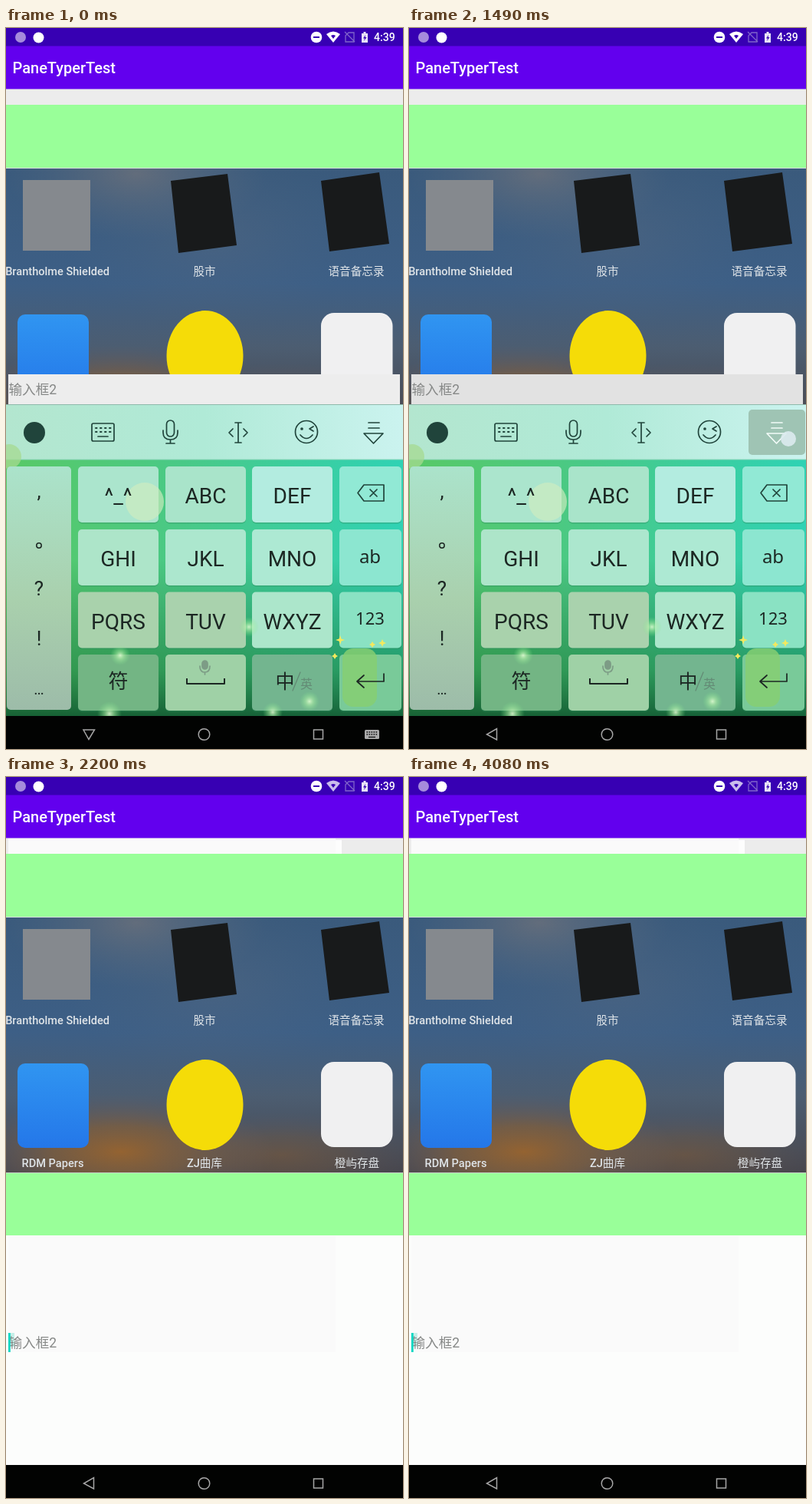
An HTML page that plays this animation: 518x939 px, repeating every 4.36 s.

```html
<!DOCTYPE html>
<html lang="zh-CN">
<head>
<meta charset="utf-8">
<title>Keyboard demo</title>
<style>
  html, body { margin: 0; width: 100%; height: 100%; overflow: hidden; background: #fcfdfc; }
  svg { display: block; width: 100vw; height: 100vh; }
  text { font-family: Roboto, "Noto Sans CJK SC", "Noto Sans CJK", sans-serif; }
  .label { font-size: 14.6px; font-weight: 500; fill: #dfe4e8; text-anchor: middle; }
  .hint { font-size: 17.6px; fill: #868887; }
  .key { font-size: 28px; fill: #1c2723; text-anchor: middle; }
  .side { font-family: "Noto Sans", sans-serif; fill: #1c2723; text-anchor: middle; }
  .line { fill: none; stroke: #20443b; stroke-width: 1.7; stroke-linecap: round; stroke-linejoin: round; }
  .nav { fill: none; stroke: #a6a6a6; stroke-width: 1.5; }
</style>
</head>
<body>
<svg viewBox="0 0 518 939" preserveAspectRatio="none">
  <defs>
    <linearGradient id="sky" x2="0" y2="1">
      <stop offset="0" stop-color="#3a5a7c"/><stop offset=".45" stop-color="#3d5f86"/>
      <stop offset=".7" stop-color="#4c5d71"/><stop offset="1" stop-color="#46454c"/>
    </linearGradient>
    <radialGradient id="dusk"><stop offset="0" stop-color="#946331"/><stop offset=".45" stop-color="#80603f" stop-opacity=".75"/><stop offset="1" stop-color="#666066" stop-opacity="0"/></radialGradient>
    <radialGradient id="haze"><stop offset="0" stop-color="#70737b" stop-opacity=".75"/><stop offset="1" stop-color="#596b80" stop-opacity="0"/></radialGradient>
    <linearGradient id="blue" x2="0" y2="1"><stop stop-color="#3095f1"/><stop offset="1" stop-color="#2477e9"/></linearGradient>
    <linearGradient id="leaf" x2="1" y2="0"><stop stop-color="#58c966"/><stop offset=".45" stop-color="#49c987"/><stop offset="1" stop-color="#2fd2b4"/></linearGradient>
    <linearGradient id="shade" x2="0" y2="1"><stop offset=".5" stop-color="#1a6d3c" stop-opacity="0"/><stop offset=".85" stop-color="#21803f" stop-opacity=".65"/><stop offset="1" stop-color="#145c32" stop-opacity=".95"/></linearGradient>
    <linearGradient id="tools"><stop stop-color="#b3e6cf"/><stop offset=".5" stop-color="#b0ead7"/><stop offset="1" stop-color="#cbf3ef"/></linearGradient>
    <linearGradient id="column" x2="0" y2="1"><stop stop-color="#abe3cb"/><stop offset=".55" stop-color="#a9d0ad"/><stop offset="1" stop-color="#9dbca9"/></linearGradient>
    <radialGradient id="glow"><stop stop-color="#e6ffd6" stop-opacity=".85"/><stop offset=".4" stop-color="#b4f4a9" stop-opacity=".5"/><stop offset="1" stop-color="#7ee68b" stop-opacity="0"/></radialGradient>
    <clipPath id="photoClip"><rect y="182" width="518" height="334"/></clipPath>
    <clipPath id="ghostClip"><rect x="85" y="717" width="428" height="39"/></clipPath>
    <clipPath id="boardClip"><rect y="490" width="518" height="406"/></clipPath>
  </defs>

  <!-- page -->
  <rect width="518" height="939" fill="#fcfdfc"/>
  <rect y="79" width="518" height="21" fill="#ececec"/>
  <g data-part="refresh">
    <rect x="3" y="80" width="427" height="20" fill="#fafafa"/>
    <rect x="430" y="82" width="8" height="18" fill="#fdfdfd"/>
    <rect x="3" y="598" width="427" height="151" fill="#fafafa"/>
  </g>
  <rect data-part="wash" y="597" width="518" height="299" fill="#f9fbfa"/>
  <path d="M0 100H518V182H0zM0 515H518V597H0z" fill="#99ff99"/>

  <!-- wallpaper -->
  <g clip-path="url(#photoClip)">
    <rect y="182" width="518" height="334" fill="url(#sky)"/>
    <ellipse cx="170" cy="190" rx="170" ry="85" fill="url(#haze)"/>
    <ellipse cx="270" cy="270" rx="190" ry="120" fill="url(#haze)" opacity=".3"/>
    <ellipse cx="150" cy="488" rx="200" ry="75" fill="url(#dusk)"/>
    <ellipse cx="360" cy="492" rx="180" ry="55" fill="url(#dusk)" opacity=".4"/>
    <path d="M0 182.500H518" stroke="#d3e6dc"/>
    <path d="M0 515.500H518" stroke="#c4d2c5"/>
    <rect x="22" y="198" width="88" height="92" fill="#85898e"/>
    <path d="M215 199L289 190 301 283 225 293zM411 199L487 188 500 281 422 291z" fill="#181a1b"/>
    <rect x="15" y="373" width="93" height="110" rx="10" fill="url(#blue)"/>
    <ellipse cx="259.500" cy="427" rx="50" ry="59" fill="#f5dc08"/>
    <rect x="411" y="371" width="93.500" height="111" rx="17" fill="#f0f0f1"/>
    <text class="label" x="135" y="322" style="text-anchor:end">Brantholme Shielded</text>
    <text class="label" x="259" y="322">股市</text>
    <text class="label" x="457" y="322">语音备忘录</text>
    <text class="label" x="61" y="508">RDM Papers</text>
    <text class="label" x="259" y="508">ZJ曲库</text>
    <text class="label" x="458" y="508">橙屿存盘</text>
  </g>

  <!-- field at rest -->
  <g data-part="closed">
    <g data-part="ghost" clip-path="url(#ghostClip)">
      <rect x="85" y="717" width="428" height="39" fill="#dde4df"/>
      <rect x="85" y="717" width="123" height="39" fill="#d7e8dc"/>
      <g id="ghostKeys"></g>
    </g>
    <rect data-part="trail" x="5" y="724" width="6" height="18" fill="#c6eee8"/>
    <text class="hint" x="3.500" y="743">输入框2</text>
    <rect data-part="restCaret" x="3" y="724" width="2.800" height="25" fill="#12d7c3"/>
  </g>

  <!-- field and keyboard while typing -->
  <g data-part="open">
    <rect x="3" y="451" width="511" height="39" fill="#ededed"/>
    <rect data-part="dimField" x="3" y="451" width="495" height="39" fill="#e2e2e2"/>
    <rect data-part="dimEdge" x="498" y="451" width="16" height="39" fill="#e2e2e2"/>
    <text class="hint" x="3.500" y="477">输入框2</text>
    <rect data-part="typeCaret" x="3" y="459" width="2.500" height="24" fill="#12d7c3"/>
    <g clip-path="url(#boardClip)">
      <rect y="490" width="518" height="406" fill="url(#leaf)"/>
      <rect y="490" width="518" height="406" fill="url(#shade)"/>
      <rect y="490" width="518" height="72" fill="url(#tools)"/>
      <path d="M0 490.500H518" stroke="#8fb9ab"/>
      <path d="M0 562H518" stroke="#8ed6bb"/>
      <circle cx="4" cy="558" r="16" fill="#a5d990" opacity=".75"/>
      <rect x="1" y="571" width="84" height="317" rx="5" fill="url(#column)"/>
      <g id="keys"></g>
      <g id="lights"></g>
      <rect x="439" y="808" width="45" height="76" rx="14" fill="#86cf72" opacity=".85"/>
      <g id="sparks" fill="#f3e95e"></g>
      <g id="marks"></g>
      <g class="line">
        <path d="M467 595H493V616H467L459 605.500zM475 601L484 610M484 601L475 610"/>
        <path d="M236 847V854H285V847" stroke="#1c2723" stroke-width="2" stroke-linecap="butt"/>
        <path d="M493 841V851H459M467 843L458 851 467 859" stroke="#1c2723"/>
        <g stroke="#7d9c86"><rect x="256" y="824" width="7" height="11" rx="3.500" fill="#7d9c86"/><path d="M253 831Q253 839 259.500 839T266 831M259.500 839V842"/></g>
        <path d="M384 839L374 863" stroke="#638b75" stroke-width="1.300"/>
      </g>
      <text class="key" x="364" y="860" style="font-size:25px">中</text>
      <text class="key" x="392" y="860" style="font-size:16px;fill:#638b75">英</text>
      <!-- tool row -->
      <circle cx="37" cy="527" r="14" fill="#20443b"/>
      <g class="line">
        <rect x="112" y="515" width="29" height="23" rx="2"/>
        <path d="M117 521H137M117 526H137" stroke-dasharray="1.500 4.500" stroke-width="2"/><path d="M120 532H133"/>
        <rect x="209.500" y="511" width="10" height="21" rx="5"/>
        <path d="M205 524V527Q205 536 214.500 536T224 527V524M214.500 536V541M209 541H220"/>
        <path d="M303 514V540M299 514H307M299 540H307M296 522L291 527 296 532M310 522L315 527 310 532"/>
        <circle cx="392" cy="526" r="14.500"/>
        <path d="M384 530Q392 539 400 530M401 519L396 522 401 525"/><circle cx="386" cy="522" r="1" fill="#20443b"/>
      </g>
      <rect data-part="press" x="443" y="497" width="74" height="59" rx="5" fill="#9fc4b4"/>
      <path id="hideIcon" class="line" d="M473 514H487M473 521H487M467 528H492L479.500 541z"/>
      <circle data-part="press" cx="495" cy="535" r="10" fill="#dcebee" opacity=".9"/>
    </g>
  </g>

  <!-- status and title bars -->
  <rect width="518" height="24" fill="#3700b3"/>
  <rect y="23.500" width="518" height="56" fill="#6200ee"/>
  <text x="8.500" y="59" font-size="20" font-weight="500" fill="#fff">PaneTyperTest</text>
  <circle cx="19" cy="12" r="7" fill="#a68bdc"/>
  <circle cx="42.500" cy="12.500" r="7" fill="#fff"/>
  <circle cx="405" cy="12" r="7.300" fill="#fff"/><path d="M401 12H409" stroke="#3700b3" stroke-width="2"/>
  <path id="wifi" d="M418 8Q427 1 436 8L427 19z"/>
  <path d="M424 10Q427 8 430 10L427 14z" fill="#3700b3"/>
  <path d="M447 6H454V18H443V10zM442 5L455 18" fill="none" stroke="#8065cb" stroke-width="1.300"/>
  <path d="M464 7H466.500V5H469.500V7H472V19H464z" fill="#e9e4f7"/><path d="M469 9L466 13.500H468L467 17 470.500 12H468.500z" fill="#3700b3"/>
  <text x="480" y="17" font-size="14" font-weight="500" fill="#fff">4:39</text>

  <!-- navigation bar -->
  <rect y="896" width="518" height="43" fill="#020302"/>
  <path id="back" class="nav"/>
  <circle class="nav" cx="258.500" cy="920" r="7.300"/>
  <rect class="nav" x="401.500" y="914" width="12" height="12"/>
  <g data-part="navBoard">
    <rect x="468" y="914" width="19" height="12" rx="1.500" fill="#aaa"/>
    <path d="M470.500 917H485M470.500 920H485" stroke="#111" stroke-dasharray="1.600 1.400" stroke-width="1.600"/><path d="M473 923.500H482" stroke="#111" stroke-width="1.300"/>
  </g>
</svg>
<script>
const LOOP = 4360;
const $ = id => document.getElementById(id);
const rect = (x, y, w, h, fill, rx = 5) =>
  `<rect x="${x}" y="${y}" width="${w}" height="${h}" rx="${rx}" fill="${fill}"/>`;
const text = (cls, x, y, size, s) =>
  `<text class="${cls}" x="${x}" y="${y}" style="font-size:${size}px">${s}</text>`;

const columns = [94, 208, 321, 435], rows = [571, 653, 734.5, 816];
const tints = [
  ['#abe5cd', '#a9e4ca', '#b3ece0', '#91e9d5'],
  ['#ade5c9', '#ace7ce', '#ade9d3', '#8ce6d0'],
  ['#a9d2ac', '#a9d2ad', '#ace6cb', '#8ae2c3'],
  ['#73b584', '#9fd1a6', '#73b58f', '#79ca99']
];
const names = ['^_^ ABC DEF', 'GHI JKL MNO', 'PQRS TUV WXYZ'].map(s => s.split(' '));

$('keys').innerHTML = rows.map((y, r) => columns.map((x, c) => {
  const w = c === 3 ? 81 : 105;
  return rect(x, y + 1.5, w, 73, '#2d8a5d66') + rect(x, y, w, 73, tints[r][c]);
}).join('')).join('') + '<circle cx="181" cy="617" r="25" fill="#d2edc0" opacity=".65"/>';

$('marks').innerHTML =
  names.map((row, r) => row.map((s, c) => text('key', columns[c] + 52.5, rows[r] + 48, 28, s)).join('')).join('') +
  text('side', 475, 697, 24, 'ab') + text('side', 475, 777, 22, '123') + text('key', 146.5, 860, 26, '符') +
  text('key', 43, 612, 26, ',') + text('key', 43, 739, 26, '?') +
  text('key', 43, 804, 26, '!') + text('key', 43, 868, 20, '…') +
  '<circle cx="43" cy="674" r="3.2" fill="none" stroke="#1c2723" stroke-width="1.5"/>';

const lights = [[149, 817, 13], [135, 893, 16], [348, 891, 13], [396, 877, 13], [317, 780, 13]];
$('lights').innerHTML = lights.map(([x, y, r]) => `<circle cx="${x}" cy="${y}" r="${r}" fill="url(#glow)"/>`).join('');
$('sparks').innerHTML = [[436, 797, 6], [429, 818, 4], [478, 803, 4], [491, 801, 5]].map(([x, y, r]) =>
  `<path d="M${x} ${y - r}l1.5 ${r - 1.5} ${r - 1.5} 1.5 ${1.5 - r} 1.5 -1.5 ${r - 1.5} -1.5 ${1.5 - r} ${1.5 - r} -1.5 ${r - 1.5} -1.5z"/>`).join('');

$('ghostKeys').innerHTML = ['GHI', 'JKL', 'MNO', 'ab'].map((s, c) =>
  rect([94, 208, 323, 443][c], 724, c === 3 ? 70 : 104, 60, '#f8faf9', 4) +
  `<text class="key" x="${columns[c] + (c === 3 ? 40 : 52.5)}" y="769" style="fill:#d9dedb">${s}</text>`).join('');

// Visible intervals of each part, in ms.
const shown = {
  open: [[0, 1640]],
  closed: [[1640, LOOP]],
  wash: [[1640, 1920]],
  ghost: [[1640, 1770]],
  refresh: [[1920, LOOP]],
  dimField: [[150, 1640]],
  dimEdge: [[1370, 1640]],
  typeCaret: [[150, 700], [1130, 1490]],
  press: [[1370, 1640]],
  navBoard: [[0, 1490]],
  restCaret: [[2050, 2630], [3190, 3660], [4080, LOOP]],
  trail: [[2200, 2630], [3190, LOOP]]
};
const parts = [...document.querySelectorAll('[data-part]')];

function draw(now) {
  const t = now % LOOP;
  for (const el of parts) {
    const on = shown[el.dataset.part].some(([from, to]) => t >= from && t < to);
    el.style.display = on ? '' : 'none';
  }
  $('back').setAttribute('d', t < 1490 ? 'M101 914H115.500L108 926.500z' : 'M114.500 912.500V927L101.500 920z');
  $('hideIcon').style.stroke = t >= 1370 ? '#f2fbf8' : '';
  $('wifi').setAttribute('fill', t >= 1920 ? '#c9bcec' : '#fff');
  requestAnimationFrame(draw);
}
draw(performance.now());
</script>
</body>
</html>
```
